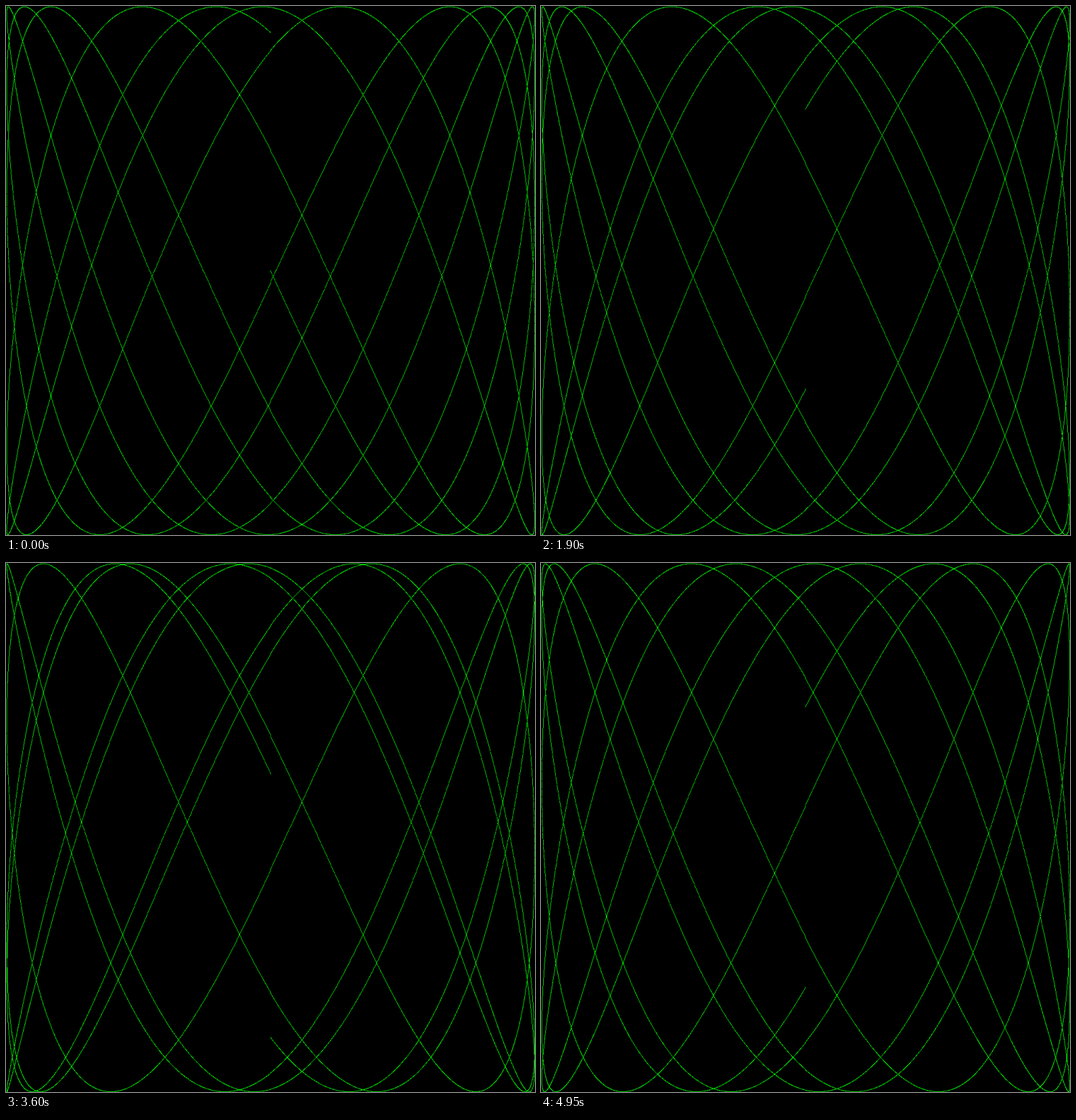
An HTML page with a canvas that plays this animation: 748 px wide and 748 px high, repeating every 5 s.

```html
<!DOCTYPE html>
<html lang="en">
<head>
<meta charset="utf-8">
<title>Lissajous</title>
<style>
  html, body { margin: 0; width: 100%; height: 100%; overflow: hidden; background: #000; }
  canvas { display: block; width: 748px; height: 748px; }
</style>
</head>
<body>
<canvas id="stage" width="748" height="748"></canvas>
<script>
  const SIZE = 748;
  // The curve is plotted on a finer grid and averaged down to the stage.
  const R = 500, GRID = 2 * R + 1, SCALE = SIZE / GRID;
  const FREQ = 2.164326, CYCLES = 5, STEP = 0.001;
  const FRAMES = 100, DELAY = 50, PHASE_STEP = 0.1;

  const ctx = document.getElementById('stage').getContext('2d');
  const image = ctx.createImageData(SIZE, SIZE);
  const plotted = new Uint8Array(GRID * GRID);
  const light = new Float32Array(SIZE * SIZE);
  const count = Math.ceil(CYCLES * 2 * Math.PI / STEP);
  const toGrid = v => R + Math.trunc(v * R + 0.5);

  // Stage cell under a grid cell, and its share in that cell and the next.
  function cover(p) {
    const start = p * SCALE, cell = Math.floor(start);
    const near = Math.min(SCALE, cell + 1 - start);
    return { cell, share: [near, SCALE - near] };
  }
  const covers = Array.from({ length: GRID }, (_, p) => cover(p));

  function splat(x, y) {
    const cx = covers[x], cy = covers[y];
    for (let j = 0; j < 2; j++) {
      for (let i = 0; i < 2; i++) {
        light[(cy.cell + j) * SIZE + cx.cell + i] += cx.share[i] * cy.share[j];
      }
    }
  }

  function draw(phase) {
    plotted.fill(0);
    light.fill(0);
    for (let i = 0; i < count; i++) {
      const t = i * STEP;
      const x = toGrid(Math.sin(t));
      const y = toGrid(Math.sin(t * FREQ + phase));
      const cell = y * GRID + x;
      if (plotted[cell]) continue;
      plotted[cell] = 1;
      splat(x, y);
    }
    for (let i = 0; i < light.length; i++) {
      image.data[i * 4 + 1] = 255 * light[i];
      image.data[i * 4 + 3] = 255;
    }
    ctx.putImageData(image, 0, 0);
  }

  let shown = -1;
  function tick() {
    const frame = Math.floor(performance.now() / DELAY) % FRAMES;
    if (frame !== shown) {
      shown = frame;
      draw(frame * PHASE_STEP);
    }
    requestAnimationFrame(tick);
  }
  tick();
</script>
</body>
</html>
```
